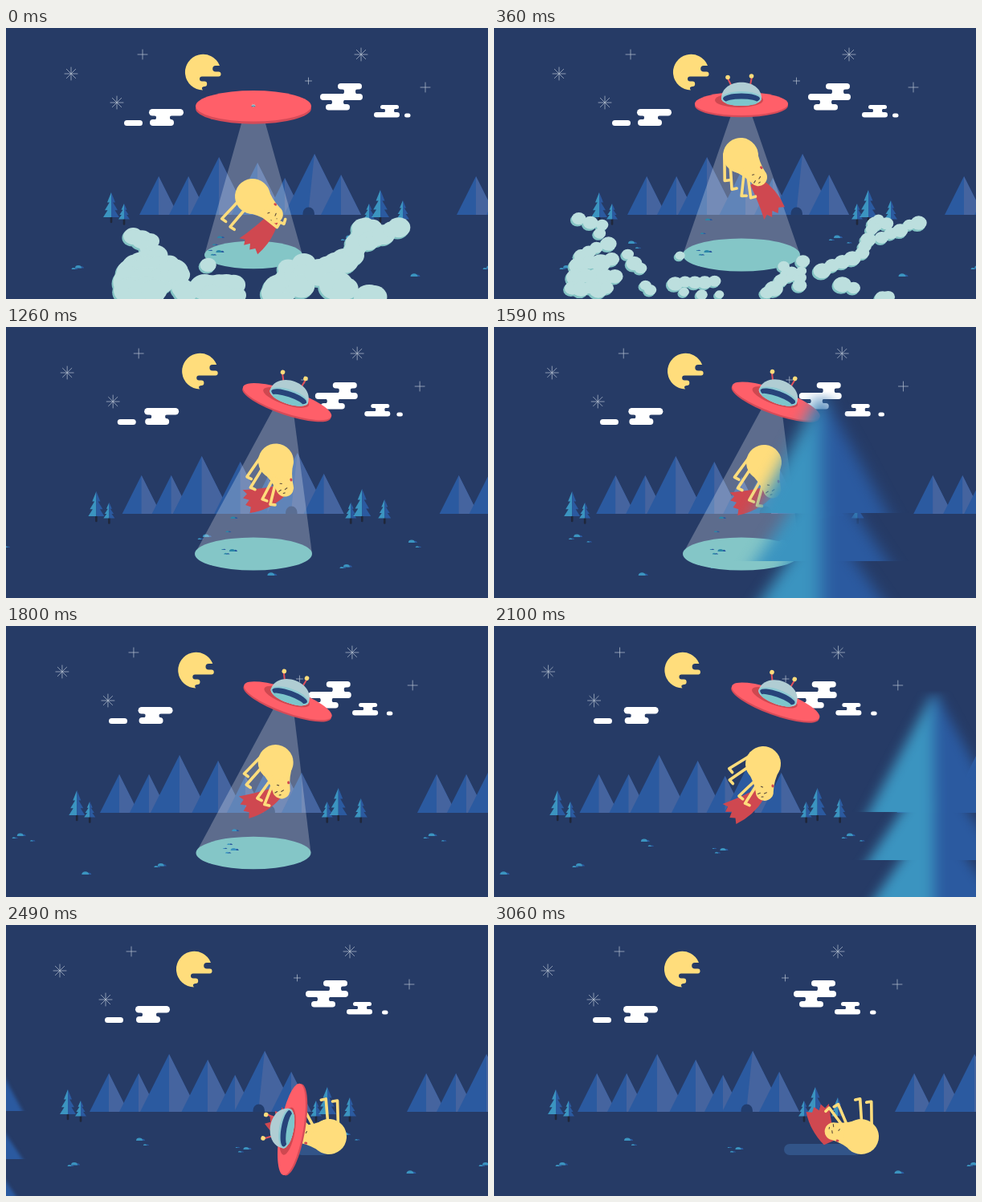
Write an HTML page that moves like this. It is 600 by 338 pixels and loops after 3.09 s.

```html
<!DOCTYPE html>
<html lang="en">
<head>
<meta charset="utf-8">
<title>Night abduction</title>
<style>
  html, body { margin: 0; height: 100%; overflow: hidden; background: #263b66; }
  svg { display: block; width: 100vw; height: 100vh; }
</style>
</head>
<body>
<svg id="stage" viewBox="0 0 600 338"></svg>
<script>
const LOOP = 3090, STEP = 30;
const YELLOW = '#ffdd7c', RED = '#ff5f69', DARK_RED = '#cf4850', TEAL = '#3b94c0', BLUE = '#2b5aa0';

const lerp = (a, b, u) => a + (b - a) * u;
const clamp = u => Math.min(1, Math.max(0, u));
const linear = u => u;
const easeIn = u => u * u;
const easeOut = u => 1 - (1 - u) ** 2;
const smooth = u => u * u * (3 - 2 * u);
const span = (t, from, to, ease = linear) => ease(clamp((t - from) / (to - from)));

// Keys are [time, ease into this key, ...values].
function at(keys, t) {
  const i = keys.findLastIndex(k => k[0] <= t);
  const [t0, , ...a] = keys[i];
  if (!keys[i + 1]) return a;
  const [t1, ease, ...b] = keys[i + 1];
  const u = ease((t - t0) / (t1 - t0));
  return a.map((v, j) => lerp(v, b[j], u));
}

const path = (d, fill) => `<path d="${d}" fill="${fill}"/>`;
const ellipse = (x, y, rx, ry, fill) => `<ellipse cx="${x}" cy="${y}" rx="${rx}" ry="${ry}" fill="${fill}"/>`;
const line = (d, color, w) => `<path d="${d}" fill="none" stroke="${color}" stroke-width="${w}" stroke-linecap="round" stroke-linejoin="round"/>`;
const group = (transform, body) => `<g transform="${transform}">${body}</g>`;
const shift = (dx, body) => group(`translate(${dx} 0)`, body);

// ---- sky ----
function star(x, y, r, rays) {
  let d = '';
  for (let i = 0; i < rays; i++) {
    const a = i * Math.PI / rays, c = r * Math.cos(a), s = r * Math.sin(a);
    d += `M${x - c} ${y - s}L${x + c} ${y + s}`;
  }
  return line(d, '#b9c4d3', 0.7);
}
const stars = star(81, 57, 8, 4) + star(138, 93, 8, 4) + star(442, 33, 8, 4) +
  star(170, 33, 6, 2) + star(376.5, 66, 4, 2);
const moon = path('M245 77.5A22.3 22.3 0 1 1 266 47H261a3.8 3.8 0 0 0 0 7.6H264.5a3 3 0 0 1 0 6H244' +
  'a3 3 0 0 0 0 6H247a3.2 3.2 0 0 1 0 6.4Q242 73.5 245 77.5Z', YELLOW);

const pill = (x1, x2, y1, y2) =>
  `<rect x="${x1}" y="${y1}" width="${x2 - x1}" height="${y2 - y1}" rx="${(y2 - y1) / 2}" fill="#fff"/>`;
function joint(x1, x2, y1, y2) {
  const g = (y2 - y1) / 2;
  return path(`M${x1 - g} ${y1}a${g} ${g} 0 0 1 0 ${2 * g}H${x2 + g}a${g} ${g} 0 0 1 0 ${-2 * g}Z`, '#fff');
}
const clouds = [
  [17, pill(178, 221, 101, 109.5) + joint(187, 204, 109, 114.5) + pill(179, 209, 114, 122)],
  [24, pill(147, 170, 115, 122)],
  [18, pill(413, 443, 69, 76.5) + joint(421, 435, 76, 82.5) + pill(391, 444, 82, 90) +
       joint(406, 420, 89.5, 95.5) + pill(398, 428, 95, 102.5)],
  [34, pill(466, 489, 96, 101) + joint(472, 483, 100.5, 105.5) + pill(458, 490, 105, 111.5)],
  [28, pill(496, 503.5, 106.5, 111.5)]
];

// ---- land ----
const mountain = (x, y, skew = 0) => {
  const h = 233 - y, w = h / 2;
  return path(`M${x} ${y}L${x - w} 233H${x + w}Z`, BLUE) +
    path(`M${x} ${y}L${x - skew} 233H${x + w}Z`, '#45649f');
};
const range = mountain(190, 185) + mountain(227, 185) + mountain(265, 161) + mountain(313, 168) +
  mountain(347, 187) + mountain(384, 157, 8) + mountain(417, 183) +
  path('M369.5 233v-2a7.2 7.5 0 0 1 14.4 0v2Z', '#223d6e');

function pine(x, top, base, w) {
  const h = base - top;
  const half = s => {
    const p = [[0.5, 0.4], [0.22, 0.4], [0.8, 0.72], [0.45, 0.72], [1, 1], [0, 1]];
    return `M${x} ${top}` + p.map(([a, b]) => `L${x + s * a * w} ${top + b * h}`).join('') + 'Z';
  };
  return line(`M${x} ${base}V${base + 6}`, '#20273a', 2.6) + path(half(-1), TEAL) + path(half(1), BLUE);
}
const leftPines = pine(131, 205, 236, 10) + pine(147, 219, 238.5, 7);
const rightPines = pine(452, 219, 238.5, 7) + pine(466, 202, 236, 11) + pine(494, 215, 238.5, 8);

const bush = (x, y, w, color = TEAL) =>
  path(`M${x} ${y}h${w + 3}a3 3 0 0 0-4-${w / 2}Z`, BLUE) +
  path(`M${x - w} ${y}a${w} ${w * 0.85} 0 0 1 ${2 * w} 0Z`, color);
const bushes = bush(84, 301, 2.5) + bush(90, 299.5, 4) + bush(171, 269, 4) + bush(178, 275, 2.2) +
  bush(427, 262, 4) + bush(419, 265, 2.2) + bush(441, 268.5, 1.8) + bush(508, 310, 4.5);

// ---- foreground trees ----
const bigHalf = s => `M0 80L${82 * s} 232H${42 * s}L${82 * s} 292H${42 * s}L${82 * s} 350H0Z`;
const bigTree = path(bigHalf(-1), TEAL) + path(bigHalf(1), BLUE);
function foreground(t) {
  const start = 575, end = 2610, travel = 4150;
  const u = clamp((t - start) / (end - start));
  const left = travel * (1 - smooth(u));
  const speed = travel / (end - start) * 6 * u * (1 - u);
  const trees = [-103, -1675, -3172].map(x => x + left).filter(x => x > -150 && x < 750);
  return `<filter id="smear" filterUnits="userSpaceOnUse" x="-150" y="0" width="300" height="360"
    color-interpolation-filters="sRGB"><feGaussianBlur stdDeviation="${speed * 3.6} 0"/></filter>` +
    trees.map(x => shift(x, `<g filter="url(#smear)">${bigTree}</g>`)).join('');
}

// ---- saucer ----
const saucerKeys = [
  [0, linear, 308, 98, 0],
  [300, easeOut, 308, 95, 0],
  [540, linear, 308, 95, 0],
  [960, smooth, 349, 94, 17.5],
  [1590, smooth, 351, 93, 20],
  [2100, smooth, 350.5, 95, 20],
  [2490, easeIn, 356, 255, -80],
  [2790, easeIn, 690, 130, -170]
];
const dome =
  ellipse(-3, -5, 30, 9, DARK_RED) +
  line('M-12-22L-17-32M11-24L13-34', '#e0505c', 2) +
  ellipse(-17, -33.5, 2.8, 2.8, YELLOW) + ellipse(12.5, -35, 2.8, 2.8, YELLOW) +
  path('M-25-7C-25-34 25-34 25-7A25 9 0 0 1-25-7Z', '#b0cdd3') +
  ellipse(0, -7, 25, 9, '#8ecad3') + ellipse(0, -7, 23, 6.5, '#27447a') + ellipse(0, -2.3, 20, 4.3, '#7cc5cb');
function saucer(t, [x, y, turn]) {
  const open = span(t, 0, 300, easeOut);
  const disc = ellipse(0, 1.8, 58, 14.5, '#d54b58') + ellipse(0, -0.5, 58, 14.5, RED);
  return group(`translate(${x} ${y}) rotate(${turn})`,
    group(`scale(${lerp(1.24, 1, open)} ${lerp(1.33, 1, open)})`, disc) +
    group(`scale(${lerp(0.1, 1, open)})`, dome));
}

function beam(t, [x, y, turn]) {
  const size = 1 - span(t, 1770, 1980, easeIn);
  if (!size) return '';
  const rx = lerp(61, 73, span(t, 0, 270, easeOut)) * size, a = turn * Math.PI / 180;
  const bx = x - 14 * Math.sin(a), by = y + 14 * Math.cos(a), w = 13 * size;
  const tilt = w * Math.sin(a);
  return `<path d="M${bx - w} ${by - tilt}L${bx + w} ${by + tilt}L${308 + rx} 283H${308 - rx}Z" fill="#fff" opacity=".25"/>` +
    ellipse(308, 283, rx, rx * 0.282, '#84c6c7');
}

const litterKeys = [
  [0, linear, 265, 261],
  [360, easeOut, 265, 239],
  [540, linear, 265, 239],
  [960, smooth, 281, 238],
  [1590, linear, 282, 238],
  [2100, linear, 285, 279],
  [2490, easeOut, 299, 279],
  [2850, easeOut, 304, 279]
];
function litter(t) {
  const [x, y] = at(litterKeys, t), tint = t < 1800 ? '#2b87a8' : TEAL;
  return bush(x, 280, 3.6, tint) + bush(x - 8, 283.5, 2.2, tint) + bush(x - 12, 278, 1.3, tint) +
    (t < 2000 ? bush(x + 1, y + 1, 3, tint) + bush(x - 6, y + 18 - 8 * (1 - span(t, 0, 360)), 2, tint) : '');
}

// ---- creature: x, y, heading, rear legs, front legs, cape angle, cape root ----
const creatureKeys = [
  [0, linear, 307, 210, 40, 5, -98, 135, 6],
  [360, easeOut, 307, 159, 51, -50, -51, 62, 6],
  [540, linear, 307, 159, 52, -50, -51, 70, 6],
  [960, smooth, 336, 166, 70, -35, -50, 168, 6],
  [1590, smooth, 336, 169, 73, -35, -50, 165, 6],
  [2100, smooth, 335, 172, 87, -27, -47, 150, 6],
  [2370, easeIn, 378, 264, 180, -10, -40, 215, -8],
  [2490, linear, 402, 264, 185, -5, -40, 230, -10],
  [2850, easeOut, 457, 264, 191, -10, -40, 254, -14]
];
const cape = path('M-2-7Q20-19 44-17L41-10 47-6 41-1 48 3 42 7 46 13Q24 9 0 8Z', DARK_RED);
const leg = (x, y, turn) =>
  group(`translate(${x} ${y}) rotate(${turn})`, line('M0-5L1 28L7 27', YELLOW, 3.6));
const torso = path('M6-21Q22-12 35-11A11 11 0 0 1 35 11Q22 12 6 21Z', YELLOW) +
  ellipse(0, 0, 22, 22, YELLOW) + ellipse(28, -10.5, 2, 1.5, DARK_RED) +
  line('M36 5.5l1 3M36-2.5l1 3M29 2l-1 2M41 2v2', '#5b4a3c', 1.1);
function creature(t) {
  const [x, y, heading, rear, front, flow, root] = at(creatureKeys, t);
  const trail = t < 2370 ? '' :
    `<rect x="361" y="273" width="${x - 361}" height="14" rx="7" fill="#325488"/>`;
  return trail + group(`translate(${x} ${y}) rotate(${heading})`,
    group(`translate(38 ${root}) rotate(${flow - heading})`, cape) +
    leg(-10, 18, rear) + leg(3, 19, rear - 3) + torso +
    leg(20, 11, front + 8) + leg(25, 9, front - 6));
}

// ---- dust: rows of puffs as x1, y1, x2, y2, radius, count ----
const dustRows = [
  [105, 238, 134, 247, 8, 3], [131, 258, 142, 268, 8, 2], [127, 275, 108, 284, 8, 3],
  [105, 296, 146, 290, 10, 4], [102, 310, 150, 311, 10, 5], [97, 325, 140, 326, 9, 5],
  [166, 284, 182, 301, 8, 3], [188, 322, 194, 327, 7, 2], [231, 283, 231, 283, 5, 1],
  [225, 318, 274, 317, 8, 5], [236, 330, 280, 334, 6, 3], [339, 332, 366, 308, 9, 4],
  [360, 298, 380, 311, 7, 3], [384, 290, 380, 320, 7, 3], [408, 302, 458, 282, 9, 5],
  [461, 273, 474, 243, 8, 4], [478, 240, 488, 243, 7, 2], [482, 262, 528, 242, 8, 5],
  [433, 319, 447, 326, 9, 2], [483, 336, 490, 336, 8, 2]
];
function dust(t) {
  if (t > 720) return '';
  const out = 1.1 * Math.sin(Math.min(1.25, t / 315));
  const fade = 1 - span(t, 360, 720, easeIn);
  const puffs = dustRows.flatMap(([x1, y1, x2, y2, r, n], row) => Array.from({ length: n }, (_, i) => {
    const u = n > 1 ? i / (n - 1) : 0, wobble = Math.sin(row * 5 + i * 2.7);
    const x = lerp(x1, x2, u), y = lerp(y1, y2, u) + wobble * 1.5;
    const isLeft = x < 308;
    const fromX = 308 + (x - 308) * (isLeft ? 0.74 : 0.82);
    const fromY = y + (338 - y) * (isLeft ? 0.22 : 0.06);
    const grow = lerp(1.4 + 0.6 * (y - 240) / 100, 1, Math.min(1, out));
    const size = r * (1 + wobble * 0.15) * grow * fade;
    return [lerp(fromX, x, out), lerp(fromY, y, out), size];
  }));
  const layer = (dx, dy, color) => puffs.map(([x, y, r]) => ellipse(x + dx, y + dy, r * 1.1, r * 0.95, color)).join('');
  return layer(-1.2, 1.8, '#84c4c4') + layer(0.6, -0.4, '#bcdfde');
}

function scene(t) {
  const pan = span(t, 575, 2310, smooth);
  const ufo = at(saucerKeys, t);
  return '<rect width="600" height="338" fill="#263b66"/>' +
    shift(-14 * pan, stars) + shift(-20 * pan, star(522, 74, 6, 2)) + shift(-11 * pan, moon) +
    clouds.map(([d, body]) => shift(-d * pan, body)).join('') +
    shift(-62 * pan, range + shift(395, range)) +
    shift(-54 * pan, leftPines) + shift(-66 * pan, rightPines) +
    [0, 512, 1024].map(x => shift(x - 517 * pan, bushes)).join('') +
    beam(t, ufo) + litter(t) + creature(t) + saucer(t, ufo) + dust(t) + foreground(t);
}

const stage = document.getElementById('stage');
const begin = performance.now();
let shown = -1;
function tick() {
  const t = Math.floor((performance.now() - begin) % LOOP / STEP) * STEP;
  if (t !== shown) stage.innerHTML = scene(shown = t);
  requestAnimationFrame(tick);
}
tick();
</script>
</body>
</html>
```
